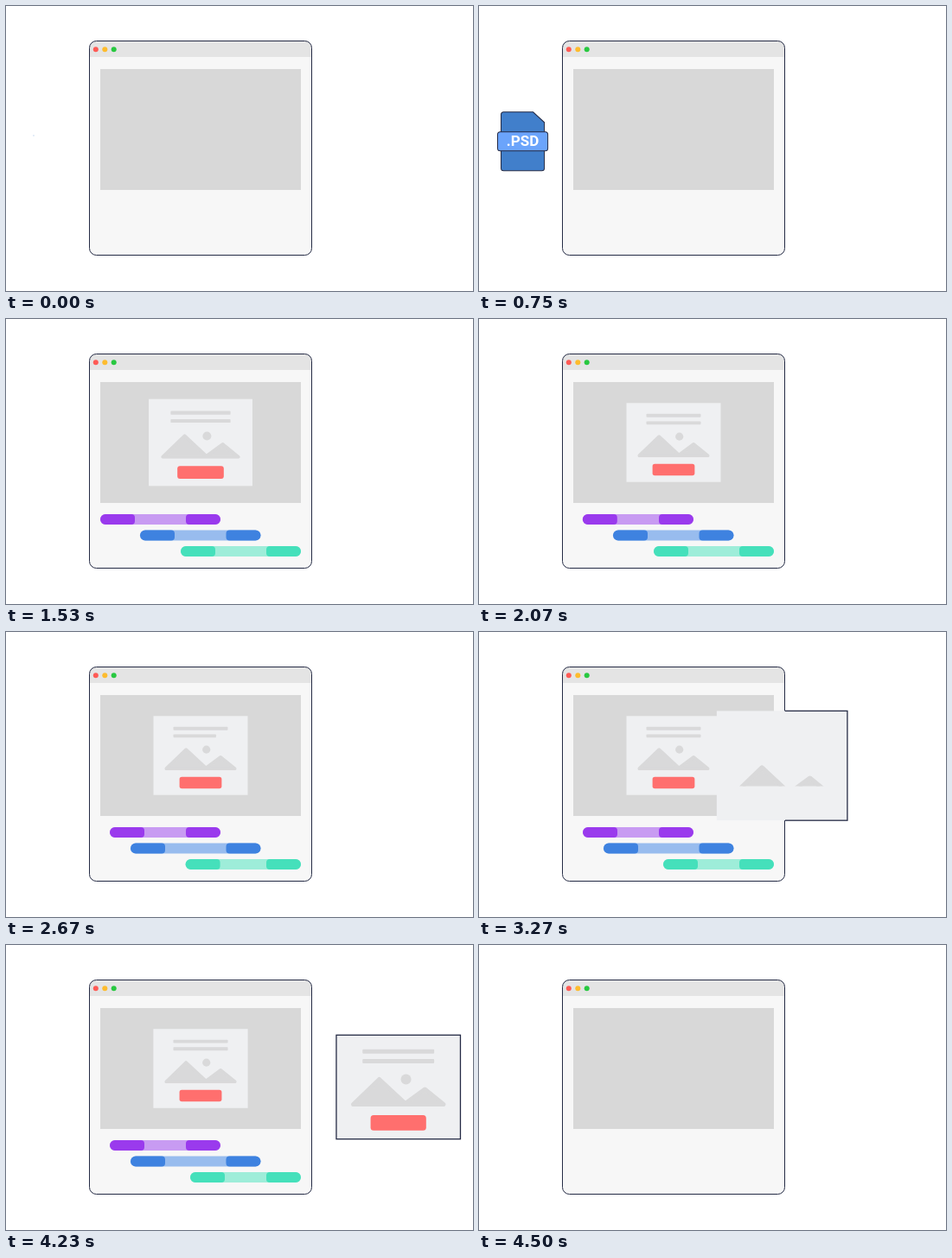
An HTML page with a canvas for the animation above (4830 ms loop, 540x330 px).

```html
<!DOCTYPE html>
<html lang="en">
<head>
<meta charset="utf-8">
<title>Layered file to animated banner</title>
<style>
html, body { margin: 0; width: 100%; height: 100%; overflow: hidden; background: #fff; }
canvas { display: block; }
</style>
</head>
<body>
<canvas id="stage" width="540" height="330"></canvas>
<script>
const ctx = document.getElementById('stage').getContext('2d');
const LOOP = 4830;
const STEP = 360;
const EXIT = 4220;
const EXIT_TIME = 280;
const INK = '#252b45';
const CARD = { w: 143, h: 120 };
const PREVIEW = { x: 225, y: 143, scale: 0.762 };
const EXPORTED = { x: 453.7, y: 164.5, scale: 1 };

const BARS = [
  { y: 226, from: 109, to: 120, end: 248, start: 1770, dark: '#9a3aed', light: '#c89bf2' },
  { y: 244.5, from: 155, to: 144, end: 294.5, start: 2130, dark: '#3e82e0', light: '#98bcee' },
  { y: 263, from: 202, to: 213, end: 341, start: 2490, dark: '#45e0bb', light: '#9eedd9' }
];

const lerp = (a, b, p) => a + (b - a) * p;
const progress = (t, start, time = STEP) => Math.min(1, Math.max(0, (t - start) / time));
const inOut = p => p < 0.5 ? 4 * p ** 3 : 1 - 4 * (1 - p) ** 3;
const inBack = (p, s = 1.70158) => p * p * ((s + 1) * p - s);
const outBack = p => 1 - inBack(1 - p);
const ease = (t, start, time) => inOut(progress(t, start, time));

function box(x, y, w, h, r, fill, stroke) {
  ctx.beginPath();
  ctx.roundRect(x, y, w, h, r);
  if (fill) {
    ctx.fillStyle = fill;
    ctx.fill();
  }
  if (stroke) {
    ctx.strokeStyle = stroke;
    ctx.lineWidth = 1;
    ctx.stroke();
  }
}

function disc(x, y, r, color) {
  ctx.fillStyle = color;
  ctx.beginPath();
  ctx.arc(x, y, r, 0, Math.PI * 2);
  ctx.fill();
}

// Draws in local coordinates around a scaled centre.
function at(x, y, scale, draw) {
  if (scale <= 0) return;
  ctx.save();
  ctx.translate(x, y);
  ctx.scale(scale, scale);
  draw();
  ctx.restore();
}

function drawWindow() {
  box(96.5, 40.5, 257, 248, 8, '#f7f7f7');
  box(96.5, 40.5, 257, 18.5, [8, 8, 0, 0], '#e4e4e4');
  box(96.5, 40.5, 257, 248, 8, null, INK);
  disc(103.8, 50.2, 3, '#ff5a55');
  disc(114.3, 50.2, 3, '#fdbc2e');
  disc(124.7, 50.2, 3, '#28c840');
  ctx.fillStyle = '#d8d8d8';
  ctx.fillRect(109, 73, 232, 140);
}

function drawBar(bar, t) {
  const shown = ease(t, 1170) * (1 - ease(t, EXIT, EXIT_TIME));
  if (shown <= 0) return;
  const x = lerp(bar.from, bar.to, ease(t, bar.start));
  const w = (bar.end - x) * shown;
  const grip = Math.min(40, w / 2);
  box(x, bar.y, w, 12, 6, bar.light);
  box(x, bar.y, grip, 12, [6, 4, 4, 6], bar.dark);
  box(x + w - grip, bar.y, grip, 12, [4, 6, 6, 4], bar.dark);
}

function drawFile() {
  ctx.beginPath();
  ctx.moveTo(-22, -34);
  ctx.lineTo(12, -34);
  ctx.lineTo(25, -22);
  ctx.lineTo(25, 31);
  ctx.quadraticCurveTo(25, 34, 22, 34);
  ctx.lineTo(-22, 34);
  ctx.quadraticCurveTo(-25, 34, -25, 31);
  ctx.lineTo(-25, -31);
  ctx.quadraticCurveTo(-25, -34, -22, -34);
  ctx.closePath();
  ctx.fillStyle = '#417fcb';
  ctx.fill();
  ctx.strokeStyle = INK;
  ctx.lineWidth = 1;
  ctx.stroke();
  box(-29, -11, 58, 22, 3, '#6ba4fb', INK);
  ctx.fillStyle = '#fff';
  ctx.font = 'bold 17px Roboto, sans-serif';
  ctx.textAlign = 'center';
  ctx.textBaseline = 'alphabetic';
  ctx.fillText('.PSD', 0, 5.5);
}

function drawMountains(rise) {
  if (rise <= 0) return;
  ctx.save();
  ctx.beginPath();
  ctx.rect(-60, -30, 120, 52.5);
  ctx.clip();
  ctx.translate(0, 34 * (1 - rise));
  ctx.beginPath();
  ctx.moveTo(-52, 20);
  ctx.lineTo(-22, -9);
  ctx.lineTo(8, 19);
  ctx.lineTo(30.5, 2.5);
  ctx.lineTo(52, 20);
  ctx.closePath();
  ctx.fillStyle = ctx.strokeStyle = '#d9d9da';
  ctx.lineWidth = 5;
  ctx.lineJoin = 'round';
  ctx.fill();
  ctx.stroke();
  ctx.restore();
}

function drawCard({ line1, line2, sun, hills, button }) {
  ctx.fillStyle = '#eff0f2';
  ctx.fillRect(-CARD.w / 2, -CARD.h / 2, CARD.w, CARD.h);
  if (line1 > 0) box(-41.3, -43.5, 82.6 * line1, 5, 1, '#d9d9da');
  if (line2 > 0) box(-41.3, -32.3, 82.6 * line2, 5, 1, '#d9d9da');
  if (sun > 0) disc(8.8, -9, 6 * sun, '#d9d9da');
  drawMountains(hills);
  at(0, 41.3, button, () => box(-32, -8.8, 64, 17.6, 3.5, '#ff6f6e'));
}

function drawPreview(t) {
  const pop = t < EXIT
    ? outBack(progress(t, 1320))
    : 1 - inBack(progress(t, EXIT, EXIT_TIME));
  const replay = start => t < start ? 1 : ease(t, start);
  at(PREVIEW.x, PREVIEW.y, PREVIEW.scale * pop, () => drawCard({
    line1: replay(2330), line2: replay(2447), sun: 1, hills: replay(2220), button: 1
  }));
}

function drawExported(t) {
  if (t < 2770) return;
  const lift = ease(t, 2770, 300);
  const move = ease(t, 3085);
  const leave = inBack(progress(t, EXIT, EXIT_TIME), 2.4);
  const lifted = lerp(PREVIEW.scale, 1.125, lift);
  const x = lerp(PREVIEW.x, EXPORTED.x, move);
  const y = lerp(PREVIEW.y, EXPORTED.y, move);
  const scale = lerp(lifted, EXPORTED.scale, move) * (1 - leave);
  if (scale <= 0) return;

  ctx.globalAlpha = progress(t, 2770, 60);
  at(x, y, scale, () => drawCard({
    line1: ease(t, 3360),
    line2: ease(t, 3480),
    sun: ease(t, 3400, 300),
    hills: ease(t, 3067),
    button: ease(t, 3840, 260)
  }));
  ctx.globalAlpha = 1;

  // The outline only shows beyond the window.
  ctx.save();
  ctx.beginPath();
  ctx.rect(354, 0, 186, 330);
  ctx.clip();
  const w = CARD.w * scale;
  const h = CARD.h * scale;
  ctx.strokeStyle = INK;
  ctx.lineWidth = 1.3;
  ctx.strokeRect(x - w / 2, y - h / 2, w, h);
  ctx.restore();
}

function drawIcon(t) {
  if (t >= 1320) return;
  const time = progress(t, 650, 350);
  const move = inOut(time);
  const x = lerp(32, 225, move);
  const y = lerp(150, 143, move) + 86 * move * (1 - move);
  const pop = t < 1000 ? outBack(progress(t, 0)) : 1 - inBack(progress(t, 1000, 320));
  const lift = 1 + 0.2 * Math.sin(Math.PI * time);
  at(x, y, 0.865 * pop * lift, drawFile);
}

function render(t) {
  ctx.fillStyle = '#fff';
  ctx.fillRect(0, 0, 540, 330);
  drawWindow();
  BARS.forEach(bar => drawBar(bar, t));
  drawPreview(t);
  drawExported(t);
  drawIcon(t);
}

const began = performance.now();
function tick() {
  render((performance.now() - began) % LOOP);
  requestAnimationFrame(tick);
}
tick();
</script>
</body>
</html>
```
